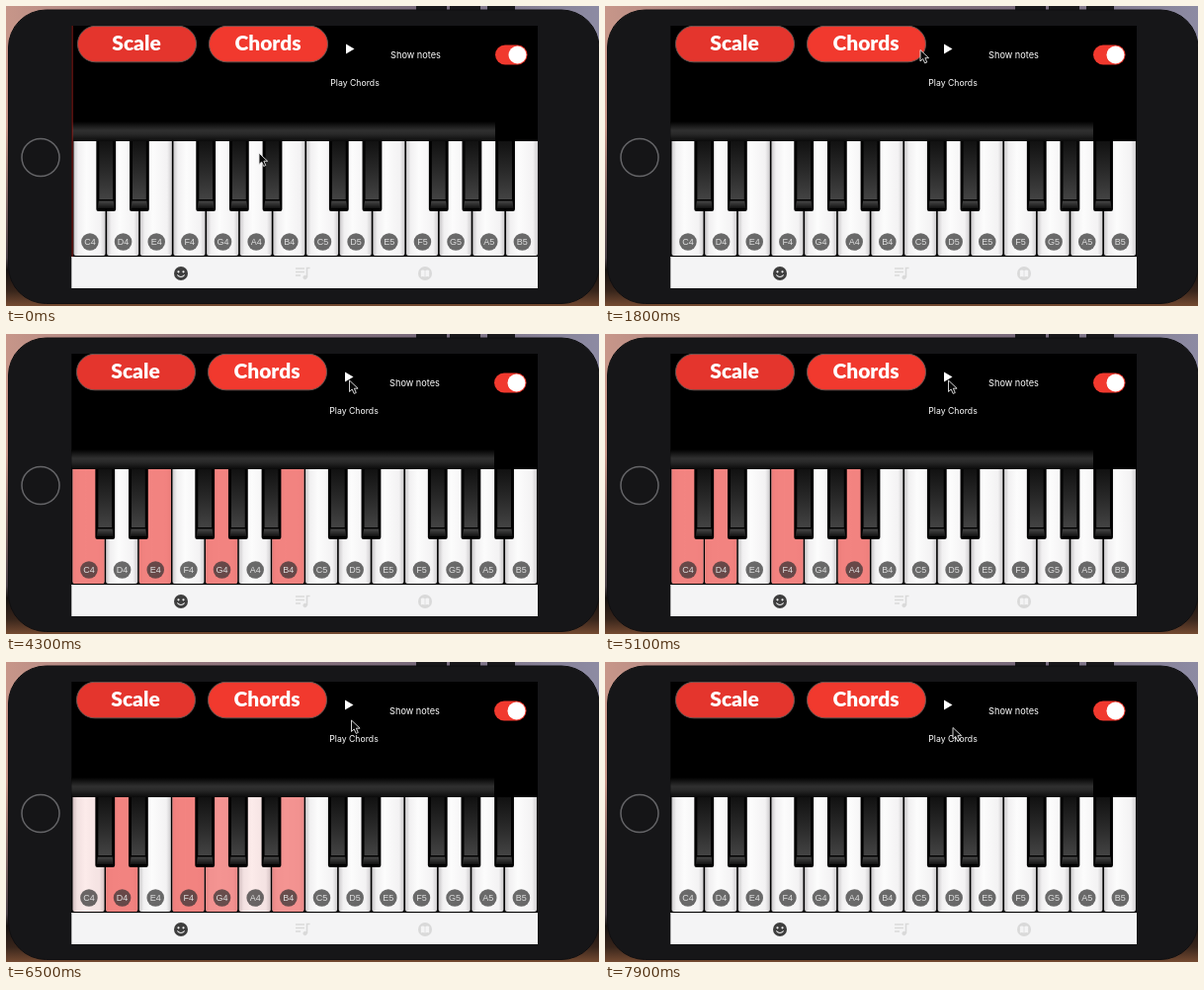
Recreate the animation shown at these times as an HTML page. Size 600x304 px, loop 8 s.

```html
<!DOCTYPE html>
<html lang="en">
<head>
<meta charset="utf-8">
<title>Piano chords</title>
<style>
html, body { margin: 0; width: 100%; height: 100%; overflow: hidden; background: #111; }
svg { display: block; width: 100vw; height: 100vh; }
text { text-anchor: middle; fill: #fff; font-family: Inter, Arial, sans-serif; }
.button { font: 900 21px Lato, sans-serif; }
.note { font: 9px "Liberation Sans", Arial, sans-serif; fill: #dedede; }
</style>
</head>
<body>
<svg viewBox="0 0 600 304">
  <defs>
    <linearGradient id="sky">
      <stop stop-color="#c79689"/><stop offset=".3" stop-color="#93767c"/>
      <stop offset=".7" stop-color="#77697a"/><stop offset="1" stop-color="#8d8ba3"/>
    </linearGradient>
    <linearGradient id="ground" x2="0" y2="1">
      <stop offset=".4" stop-color="#4a4046" stop-opacity="0"/>
      <stop offset=".84" stop-color="#4a4046"/><stop offset=".88" stop-color="#17120f"/>
      <stop offset=".95" stop-color="#38251b"/><stop offset="1" stop-color="#744a31"/>
    </linearGradient>
    <linearGradient id="strip" x2="0" y2="1">
      <stop stop-color="#000"/><stop offset=".45" stop-color="#303030"/>
      <stop offset=".65" stop-color="#282828"/><stop offset="1" stop-color="#0a0a0a"/>
    </linearGradient>
    <linearGradient id="ivory">
      <stop stop-color="#c9c7c9"/><stop offset=".14" stop-color="#f1f0f1"/>
      <stop offset=".4" stop-color="#fcfcfc"/><stop offset=".85" stop-color="#f3f2f3"/>
      <stop offset="1" stop-color="#cfcdcf"/>
    </linearGradient>
    <linearGradient id="ebony" x2="0" y2="1">
      <stop stop-color="#111"/><stop offset=".5" stop-color="#292929"/><stop offset="1" stop-color="#434343"/>
    </linearGradient>
    <linearGradient id="lip" x2="0" y2="1">
      <stop stop-color="#484848"/><stop offset="1" stop-color="#111"/>
    </linearGradient>
    <clipPath id="screen"><path d="M66.3 20H538V286H66.3z"/></clipPath>
  </defs>

  <path fill="url(#sky)" d="M0 0H600V304H0z"/>
  <path fill="url(#ground)" d="M0 0H600V304H0z"/>
  <path stroke="#18171a" stroke-width="6" d="M415 3h31M449 3h31M487 3h28"/>
  <rect x="2.5" y="4" width="597.5" height="297.5" rx="38" fill="#161618" stroke="#0f0f11"/>
  <circle cx="35" cy="153.5" r="19" fill="#151517" stroke="#656568" stroke-width="1.5"/>

  <g clip-path="url(#screen)">
    <path d="M66 20H538V254H66z"/>
    <g id="app">
      <path fill="url(#strip)" d="M66 117H494V137H66z"/>
      <g stroke="#6b5652">
        <rect x="71.5" y="20.3" width="120" height="36.5" rx="18.2" fill="#e4352d"/>
        <rect x="204.5" y="20.3" width="120" height="36.5" rx="18.2" fill="#f1392e"/>
      </g>
      <text class="button" x="131" y="45">Scale</text>
      <text class="button" x="264" y="45">Chords</text>
      <path fill="#fff" d="M343 38.5l8.5 5-8.5 5z"/>
      <text x="413.5" y="52.6" font-size="9.2">Show notes</text>
      <text x="352" y="80.6" font-size="8.7">Play Chords</text>
      <rect x="494" y="39.5" width="32.5" height="20" rx="10" fill="#f1392e"/>
      <circle cx="516.5" cy="49.5" r="9" fill="#fff"/>
      <g id="keys"></g>
    </g>
    <path id="edge" stroke="#a5231f" d="M67 20V254"/>
    <path fill="#f4f4f5" d="M66 254H538V286H66z"/>
    <path stroke="#dedede" d="M66 254.5H538"/>
    <circle cx="177" cy="271" r="7" fill="#3e3e3e"/>
    <g fill="#f4f4f5"><circle cx="174.5" cy="269.3" r="1.1"/><circle cx="179.5" cy="269.3" r="1.1"/></g>
    <path d="M173.3 272.5q3.7 4 7.4 0" fill="none" stroke="#f4f4f5" stroke-width="1.1"/>
    <g fill="none" stroke="#d9d9d9" stroke-width="1.6">
      <path d="M293 266h9M293 269.5h9M293 273h5M304.5 275v-9.5h3"/>
      <circle cx="302.6" cy="275" r="1.7" fill="#d9d9d9" stroke-width="1"/>
    </g>
    <circle cx="424" cy="271" r="7" fill="#d9d9d9"/>
    <path fill="#f4f4f5" d="M419.8 268q2-1 3.8 0v6.5q-2-1-3.8 0zM428.2 268q-2-1-3.8 0v6.5q2-1 3.8 0z"/>
  </g>
  <path id="cursor" fill="#080808" stroke="#e8e8e8" stroke-width=".9" d="M0 0V11.5L2.7 9 4.7 13.4 6.8 12.5 4.9 8.2H8.6z"/>
</svg>
<script>
const LOOP = 8000, KEY = 33.65, LEFT = 66.7, FADE = 200;
const byId = id => document.getElementById(id);
const names = [4, 5].flatMap(octave => [..."CDEFGAB"].map(n => n + octave));
const chords = [
  [2380, "C4 E4 G4 B4"],
  [4450, "C4 D4 F4 A4"],
  [6330, "D4 F4 G4 B4"],
  [7600, ""],
];
// time, x, y
const path = [
  [0, 256, 149], [700, 256, 149], [1750, 319, 44.5], [1850, 319, 44.5],
  [2300, 347.5, 47], [5300, 347.5, 47], [5500, 347.5, 48.5], [6000, 347.5, 48.5],
  [6500, 349.5, 59], [7300, 352, 66.5], [LOOP, 352, 66.5],
];

const whiteKey = (name, i) => {
  const x = LEFT + i * KEY, center = x + KEY / 2 + .4;
  const shape = `d="M${x + .8} 137h${KEY - 1.6}v114q0 2-2 2h${5.6 - KEY}q-2 0-2-2z"`;
  return `<path ${shape} fill="url(#ivory)"/>
    <path ${shape} fill="#f27370" class="glow" opacity="0"/>
    <circle cx="${center}" cy="239" r="8.8" fill="#333" fill-opacity=".72"/>
    <text class="note" x="${center}" y="242.3">${name}</text>`;
};
const blackKey = i => {
  const x = LEFT + i * KEY - 10;
  return `<path d="M${x} 137h19.8v69q0 2-2 2h-15.8q-2 0-2-2z"/>
    <path fill="url(#ebony)" d="M${x + 3} 137h13.8v59h-13.8z"/>
    <path fill="url(#lip)" d="M${x + 2.5} 197.5h14.8l1 7.5h-16.8z"/>`;
};
byId("keys").innerHTML = names.map(whiteKey).join("") +
  [1, 2, 4, 5, 6, 8, 9, 11, 12, 13].map(blackKey).join("");
const glows = document.querySelectorAll(".glow");

const clamp = v => Math.max(0, Math.min(1, v));
const smooth = v => v * v * (3 - 2 * v);

function cursorAt(t) {
  const i = path.findIndex(p => p[0] > t);
  const [t0, x0, y0] = path[i - 1], [t1, x1, y1] = path[i];
  const k = smooth((t - t0) / (t1 - t0));
  return [x0 + (x1 - x0) * k, y0 + (y1 - y0) * k];
}

function glowAt(name, t) {
  return chords.reduce((level, [start, notes]) =>
    level + (notes.includes(name) - level) * clamp((t - start) / FADE), 0);
}

function draw(now) {
  const t = now % LOOP, early = t < 1000;
  byId("app").setAttribute("transform", `translate(${early ? 1 : 0})`);
  byId("edge").setAttribute("opacity", early ? 1 : 0);
  byId("cursor").setAttribute("transform", `translate(${cursorAt(t)})`);
  glows.forEach((glow, i) => glow.setAttribute("opacity", .88 * glowAt(names[i], t)));
  requestAnimationFrame(draw);
}
requestAnimationFrame(draw);
</script>
</body>
</html>
```
